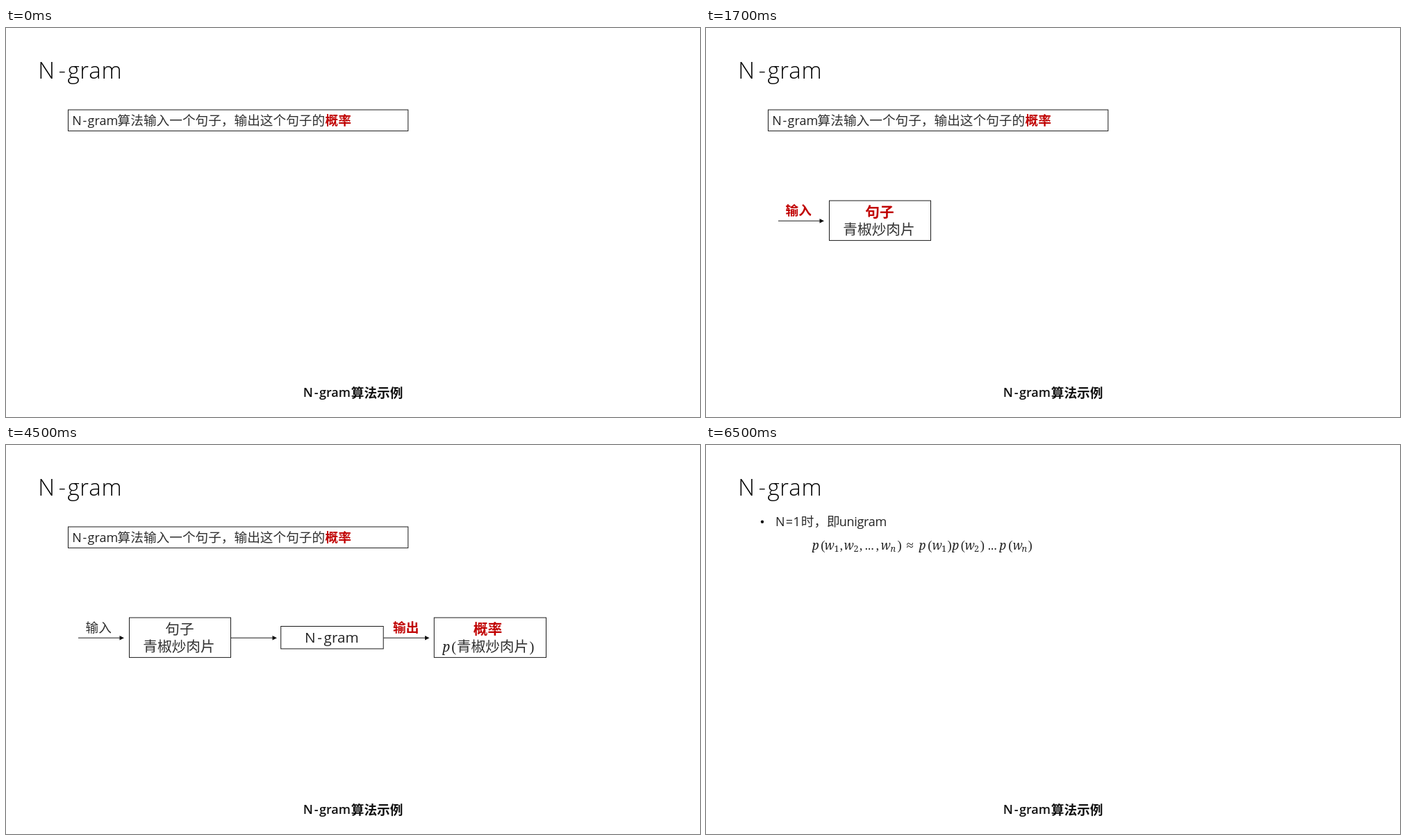
These frames come from a looping animation (999 by 561 pixels, 8 s). An HTML page:

```html
<!DOCTYPE html>
<html lang="zh-CN">
<head>
<meta charset="utf-8">
<title>N-gram算法示例</title>
<style>
  html, body { margin: 0; width: 100%; height: 100%; overflow: hidden; background: #fff; }
  svg { display: block; width: 100%; height: 100%; }

  text { font: 400 18px "Open Sans", "Noto Sans", sans-serif; fill: #222; white-space: pre; }
  .zh { font: 300 18.67px "Noto Sans CJK SC", "Noto Sans CJK", sans-serif; fill: #303030; }
  .big { font-size: 20.7px; }
  .title { font-size: 33px; font-weight: 350; letter-spacing: .7px; fill: #000; }
  .bold { font-weight: 600; fill: #111; }
  .zh.bold { font-weight: 700; }
  .bold.red { fill: #c00000; }
  .var { font: italic 400 17.4px "Noto Serif", serif; }
  .sym { font: 400 18.67px "Liberation Serif", serif; }
  .sub { font: 400 12.6px "Noto Serif", serif; }
  .sub.var { font-style: italic; }
  .var.big { font-size: 19.2px; }
  .sym.big { font-size: 20.7px; }

  rect { fill: none; stroke: #1a1a1a; }
  .hot { stroke: #c00000; stroke-width: 2; }
  .line { stroke: #1a1a1a; }
  .head { fill: #111; }

  /* each step is shown for one span of the 8 s loop */
  .step { visibility: hidden; animation: 8s step-end infinite; }
  .task { animation-name: task; }
  .input { animation-name: input; }
  .inputHot { animation-name: inputHot; }
  .inputDone, .model { animation-name: model; }
  .modelHot { animation-name: modelHot; }
  .output { animation-name: output; }
  .unigram { animation-name: unigram; }
  @keyframes task { 0% { visibility: visible } 81.25%, 100% { visibility: hidden } }
  @keyframes input { 0% { visibility: hidden } 6.25% { visibility: visible } 81.25%, 100% { visibility: hidden } }
  @keyframes inputHot { 0% { visibility: hidden } 6.25% { visibility: visible } 31.25%, 100% { visibility: hidden } }
  @keyframes model { 0% { visibility: hidden } 31.25% { visibility: visible } 81.25%, 100% { visibility: hidden } }
  @keyframes modelHot { 0% { visibility: hidden } 31.25% { visibility: visible } 56.25%, 100% { visibility: hidden } }
  @keyframes output { 0% { visibility: hidden } 56.25% { visibility: visible } 81.25%, 100% { visibility: hidden } }
  @keyframes unigram { 0% { visibility: hidden } 81.25%, 100% { visibility: visible } }
</style>
</head>
<body>
<svg viewBox="0 0 999 561">
  <defs>
    <g id="arrow">
      <path class="line" d="M0 0H61"/>
      <path class="head" d="M59.5 -3.2L66 0L59.5 3.2Z"/>
    </g>
  </defs>

  <text class="title" x="46.2 75.6 88.4" y="73">N-gram</text>
  <text class="bold" x="427.8 443.8 450.9" y="532.2">N-gram</text>
  <text class="zh bold" x="496.8" y="532.5">算法示例</text>

  <g class="step task">
    <rect x="89.5" y="118" width="489.3" height="30.4"/>
    <text x="95.3 110.4 117.6" y="139.6">N-gram</text>
    <text class="zh" x="160.6" y="140">算法输入一个句子，输出这个句子的</text>
    <text class="zh bold red" x="459.6" y="140">概率</text>
  </g>

  <g class="step input">
    <use href="#arrow" x="104" y="278.2"/>
    <rect x="177.5" y="249" width="146" height="57.4"/>
    <text class="zh big" x="197.3" y="298">青椒炒肉片</text>
  </g>
  <g class="step inputHot">
    <text class="zh bold red" x="114.6" y="269.6">输入</text>
    <text class="zh big bold red" x="229.3" y="273">句子</text>
  </g>
  <g class="step inputDone">
    <text class="zh" x="114.6" y="269.6">输入</text>
    <text class="zh big" x="229.3" y="273">句子</text>
  </g>

  <g class="step model">
    <use href="#arrow" x="324" y="278.2"/>
  </g>
  <g class="step modelHot">
    <rect class="hot" x="395.3" y="261.3" width="147.7" height="32.6"/>
    <text class="big bold red" x="429.2 447.4 455.8" y="285.4">N-gram</text>
  </g>

  <g class="step output">
    <rect x="395.7" y="261.5" width="147.5" height="32.4"/>
    <text class="big" x="430 448.3 457.6" y="285.4">N-gram</text>
    <use href="#arrow" x="543.5" y="278.2"/>
    <text class="zh bold red" x="557" y="269.6">输出</text>
    <rect x="616.3" y="249" width="161.2" height="57.4"/>
    <text class="zh big bold red" x="672.8" y="273">概率</text>
    <text class="var big" x="628.3" y="297.6">p</text>
    <text class="sym big" x="641.2 753.4" y="297.6">()</text>
    <text class="zh big" x="648.8" y="298">青椒炒肉片</text>
  </g>

  <g class="step unigram">
    <circle class="head" cx="81" cy="110.8" r="2.2"/>
    <text x="100 114.8 125.6" y="117.2">N=1</text>
    <text class="zh" x="136.8" y="117.4">时，即</text>
    <text x="191.8" y="117.2" letter-spacing="-.3">unigram</text>

    <text class="var" y="151" x="152.8 170.6 198.6 251.6 306.6 325.6 354.2 372.6 422.2 441.6">pwwwpwpwpw</text>
    <text class="var sub" y="154.4" x="265.4 454.4">nn</text>
    <text class="sub" y="154.4" x="184.4 212.4 339 386">1212</text>
    <text class="sym" y="151" x="165.2 275.6 319.2 347.4 366.8 394.8 435.2 463.6">()()()()</text>
    <text class="sym" y="151" x="192.6 220.8 244.6">,,,</text>
    <text class="sym" y="151" x="228.4 232.8 237.2 405.4 409.8 414.2">......</text>
    <text class="sym" y="151" x="288.6">≈</text>
  </g>
</svg>
</body>
</html>
```
